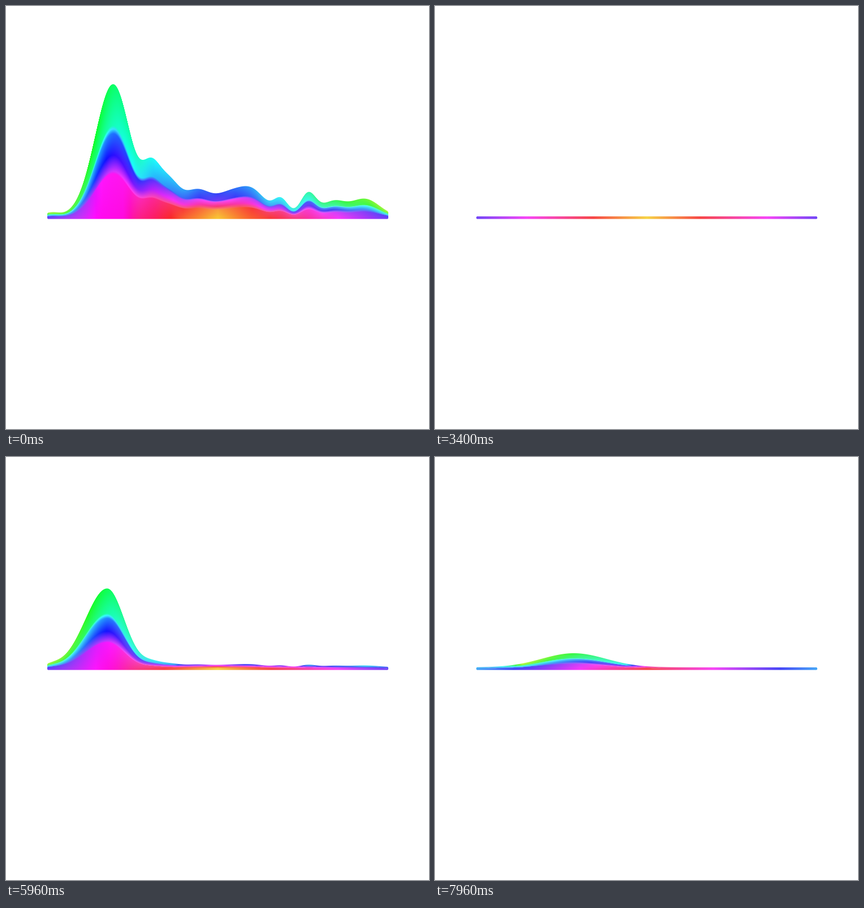
Recreate the animation shown at these times as an HTML page with a canvas. Size 748 by 748 pixels, loop 8 s.

```html
<!DOCTYPE html>
<html lang="en">
<head>
<meta charset="utf-8">
<title>Spectrum</title>
<style>
  html, body { margin: 0; width: 100%; height: 100%; overflow: hidden; background: #fff; }
  canvas { display: block; width: 100%; height: 100%; }
</style>
</head>
<body>
<canvas id="stage" width="748" height="748"></canvas>
<script>
const ctx = document.getElementById('stage').getContext('2d');
const LEFT = 73, RIGHT = 676, CENTER = 374.5, REST = 372, FOOT = 376.6;
const LOOP = 8000, STEP = 40, BEAT = 380, LEAD = 20;

// Overtones of each beat: position, height, width.
const overtones = [
  [257, 72, 16], [288, 55, 18], [337, 45, 24], [392, 34, 24], [435, 44, 24],
  [486, 29, 13], [534, 41, 14], [578, 25, 20], [634, 31, 26]];

// Three bands up each column: height fraction, hue drop, lightness.
const shades = [
  [0, 0, 52], [0.33, 14, 54], [0.35, 28, 60], [0.47, 68, 53], [0.63, 96, 56],
  [0.665, 126, 60], [0.69, 152, 54], [1, 172, 52]];

const clamp = v => Math.min(1, Math.max(0, v));
const bell = (d, width) => Math.exp(-0.5 * (d / width) ** 2);

function beatAt(t) {
  const phase = (t + LEAD) % BEAT;
  const fall = Math.max(0, phase - 80) / 300;
  const attack = 1 - Math.exp(-phase / 11);
  return {
    level: attack * Math.cos(fall * Math.PI / 2),
    ring: attack * 1.19 * Math.exp(-(phase - 20) / 120) * (1 - fall ** 4),
    center: 189 - 16 * fall,
    left: 32 + 15 * fall ** 2,
    swell: 25 * clamp((t - 7600) / 360),
  };
}

function heightAt(x, beat) {
  const d = x - beat.center;
  let h = 279 * beat.level * bell(d, d < 0 ? beat.left : 30.5);
  h += 8 * beat.level * bell(x - 80, 14);
  for (const [at, size, width] of overtones) h += size * beat.ring * bell(x - at, width);
  return Math.max(h, beat.swell * bell(x - 245, 57));
}

function draw(t) {
  const beat = beatAt(t);
  // The hues sway in the quiet gaps towards the end of the loop.
  const sway = t > 6820 ? 48 * Math.sin(Math.PI * (t - 6820) / 760) : 0;
  const shift = sway * (1 - beat.level) ** 3;
  ctx.clearRect(0, 0, 748, 748);
  for (let x = LEFT; x < RIGHT; x++) {
    const h = heightAt(x, beat);
    const inset = x === LEFT || x === RIGHT - 1 ? 0.8 : 0;
    const top = REST - h + inset;
    const hue = 48 + shift - 153 * Math.abs(x + 0.5 - CENTER) / 301;
    const spread = clamp(h / 7), pale = 9 * (1 - clamp(h / 150));
    const pull = 0.8 * clamp(h / 200) ** 2;
    const fill = ctx.createLinearGradient(0, 375, 0, top);
    for (const [at, drop, light] of shades) {
      let tone = hue - drop * spread;
      // Tall columns gather to magenta in the lowest band.
      if (at < 0.34) tone += (-56 - tone) * pull;
      fill.addColorStop(at, `hsl(${(tone + 720) % 360}, ${100 - pale}%, ${light + pale}%)`);
    }
    ctx.fillStyle = fill;
    ctx.fillRect(x, top, 1, FOOT - inset - top);
  }
}

function tick() {
  draw(Math.floor(performance.now() % LOOP / STEP) * STEP);
  requestAnimationFrame(tick);
}
tick();
</script>
</body>
</html>
```
